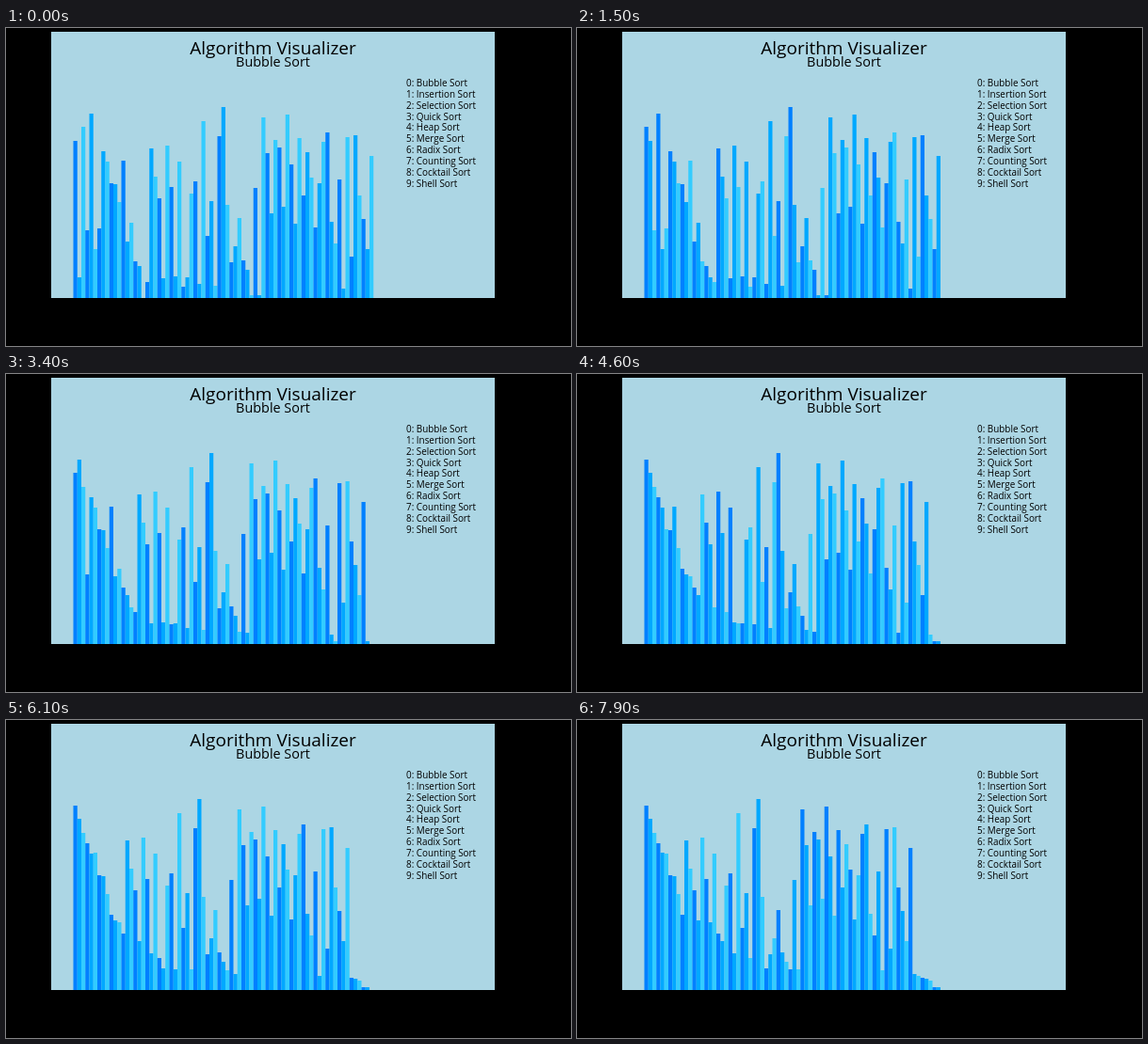
An HTML page with a canvas for the animation above (8 s loop, 600x338 px).

```html
<!DOCTYPE html>
<html lang="en">
<head>
<meta charset="utf-8">
<title>Algorithm Visualizer</title>
<style>
  html, body { margin: 0; width: 100%; height: 100%; overflow: hidden; background: #000; }
  canvas { display: block; width: 600px; height: 338px; }
</style>
</head>
<body>
<canvas id="stage" width="600" height="338"></canvas>
<script>
const ctx = document.getElementById('stage').getContext('2d');
const FONT = '"Open Sans", "Noto Sans", sans-serif';
const PANEL = { x: 48, y: 4, w: 471, h: 283 };
const FLOOR = PANEL.y + PANEL.h;
const BARS = { x: 71.5, pitch: 4.25, colors: ['#0080ff', '#00a8ff', '#33ccff'] };
const LOOP = 8000, STEP = 100, FIRST_STEP = 3;
const SWAPS_PER_STEP = 6.03, SWAP_OFFSET = 1.25;

const ALGORITHMS = ['Bubble', 'Insertion', 'Selection', 'Quick', 'Heap',
  'Merge', 'Radix', 'Counting', 'Cocktail', 'Shell'];

// Top edge of every bar before sorting
const START = [
  120, 265, 105, 215, 91, 235, 213, 131, 142, 165, 166, 185, 141, 227, 207,
  248, 253, 287, 270, 128, 158, 181, 266, 125, 169, 264, 142, 275, 265, 176,
  163, 272, 99, 221, 184, 274, 115, 84, 188, 249, 232, 202, 247, 257, 284,
  170, 284, 95, 133, 197, 119, 127, 190, 92, 145, 208, 117, 178, 132, 159,
  212, 165, 121, 111, 206, 229, 161, 277, 116, 243, 114, 178, 203, 235, 136
];

// Descending bubble sort, halted after the given number of swaps
function sortedAfter(swaps) {
  const tops = START.slice();
  for (let end = tops.length - 1; end > 0; end--) {
    for (let j = 0; j < end; j++) {
      if (tops[j] <= tops[j + 1]) continue;
      if (swaps-- <= 0) return tops;
      [tops[j], tops[j + 1]] = [tops[j + 1], tops[j]];
    }
  }
  return tops;
}

function swapsAt(step) {
  const elapsed = step - FIRST_STEP;
  return elapsed <= 0 ? 0 : Math.floor(SWAPS_PER_STEP * elapsed + SWAP_OFFSET);
}

function label(text, x, y, size, align) {
  ctx.font = `${size}px ${FONT}`;
  ctx.textAlign = align;
  ctx.fillText(text, x, y);
}

function draw(step) {
  ctx.fillStyle = '#000';
  ctx.fillRect(0, 0, 600, 338);
  ctx.fillStyle = '#acd6e4';
  ctx.fillRect(PANEL.x, PANEL.y, PANEL.w, PANEL.h);

  ctx.fillStyle = '#000';
  label('Algorithm Visualizer', 283.5, 27.5, 19, 'center');
  label('Bubble Sort', 283.5, 40.8, 14.4, 'center');
  ALGORITHMS.forEach((name, i) =>
    label(`${i}: ${name} Sort`, 425, 62 + i * 11.85, 9.9, 'left'));

  sortedAfter(swapsAt(step)).forEach((top, i) => {
    ctx.fillStyle = BARS.colors[i % 3];
    ctx.fillRect(BARS.x + i * BARS.pitch, top, BARS.pitch, FLOOR - top);
  });
}

let shown = -1;
function tick() {
  const step = Math.floor(performance.now() % LOOP / STEP);
  if (step !== shown) draw(shown = step);
  requestAnimationFrame(tick);
}
tick();
</script>
</body>
</html>
```
